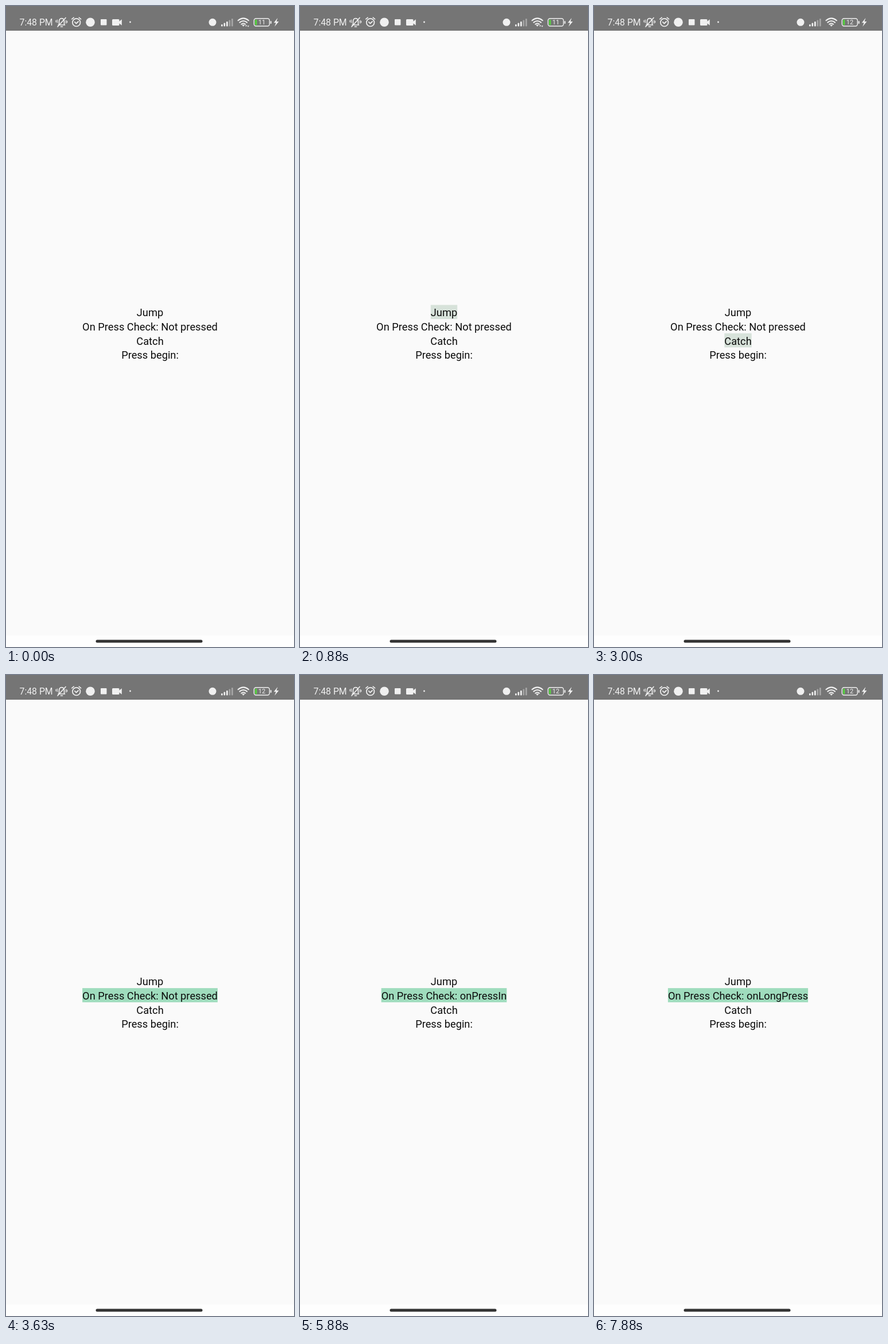
An HTML page that plays this animation: 502x1116 px, repeating every 8 s.

```html
<!DOCTYPE html>
<html lang="en">
<head>
<meta charset="utf-8">
<title>Press check</title>
<style>
  html, body { margin: 0; height: 100%; overflow: hidden; background: #fafafa; }
  svg { display: block; width: 502px; height: 1116px; font-family: Roboto, sans-serif; }
  .line { font-size: 18.25px; text-anchor: middle; fill: #0c0c0c; }
  .icon { fill: #f0f0f0; }
  .stroke { fill: none; stroke: #f0f0f0; stroke-width: 1.7; stroke-linecap: round; stroke-linejoin: round; }
</style>
</head>
<body>
<svg viewBox="0 0 502 1116">
  <rect width="502" height="1116" fill="#fafafa"/>
  <rect y="1096" width="502" height="20" fill="#fefefe"/>
  <rect x="156.5" y="1103.5" width="186" height="5" rx="2.5" fill="#333"/>
  <rect width="502" height="43" fill="#757575"/>

  <g class="icon">
    <text x="23.5" y="34" font-size="15.8">7:48 PM</text>
    <circle cx="147" cy="28.3" r="7.8"/>
    <rect x="165" y="23" width="10.5" height="10.5" rx="1"/>
    <path d="M186.5 23h9.5q1.5 0 1.5 1.5v2.3l4.3-3.6v10.6l-4.3-3.6v2.3q0 1.5-1.5 1.5h-9.5q-1.5 0-1.5-1.5v-8q0-1.5 1.5-1.5z"/>
    <circle cx="216.5" cy="28" r="1.4"/>
    <circle cx="360" cy="28.3" r="6.5"/>
    <path d="M473.5 20.8l-6.7 8.5h3.8l-2.5 6.6 7.4-8.8h-4z"/>
  </g>

  <!-- muted bell and alarm clock -->
  <g class="stroke">
    <path d="M91 33h11.5M92.5 33v-6q0-5 4.5-5.500q4.500 .5 4.500 5.500v6M95.500 36h3M104 20.500l-14 15.500"/>
    <path d="M89.300 24v5M87 25v3M104.600 25v5M106.600 26v3" stroke-width="1.2"/>
    <circle cx="122.700" cy="28.700" r="6.800"/>
    <path d="M119.800 27.800l2.500 2.700 3.800-3.500M114.800 22.800l3.300-2.700M130.600 22.800l-3.300-2.700"/>
  </g>

  <g id="signal" class="icon"></g>

  <g class="stroke" stroke-linecap="butt">
    <path d="M404.500 25.300q9.200-7.800 18.400 0M407.300 28.600q6.400-5.200 12.800 0M410.200 31.700q3.500-2.800 7 0" stroke-width="2"/>
    <path d="M412 33.300l1.700 2 1.700-2z" fill="#f0f0f0" stroke-width="1"/>
  </g>
  <path id="traffic" class="icon" d="M417 35.300l1.600-2.500 1.600 2.500zM420.600 34.200h3.200l-1.600 2.500z"/>

  <rect x="434" y="23.800" width="3.300" height="9.400" rx="1" fill="#58cf42"/>
  <rect class="stroke" x="432.300" y="21.800" width="27" height="13.200" rx="3.500" style="stroke-width:1.400"/>
  <rect class="icon" x="460.700" y="26" width="2" height="5" rx="1"/>
  <text id="charge" class="icon" x="446" y="32.400" font-size="11" text-anchor="middle"></text>

  <g id="lines"></g>
</svg>
<script>
const LOOP = 8000, PALE = '#d7e2da', GREEN = '#9fdcbd';
const $ = id => document.getElementById(id);

function add(parent, tag, attrs) {
  const node = document.createElementNS('http://www.w3.org/2000/svg', tag);
  for (const key in attrs) node.setAttribute(key, attrs[key]);
  return parent.appendChild(node);
}

for (let i = 0; i < 5; i++) {
  const h = 3.5 + i * 2.5;
  add($('signal'), 'rect', { x: 375 + i * 4.5, y: 35.5 - h, width: 2.7, height: h, rx: 1, opacity: i < 3 ? 1 : 0.4 });
}

const lines = ['Jump', '', 'Catch', 'Press begin:'].map((label, i) => {
  const back = add($('lines'), 'rect', { y: 520.5 + i * 24.65, height: 24.6 });
  const text = add($('lines'), 'text', { class: 'line', x: 251, y: 540.3 + i * 24.65 });
  text.textContent = label;
  return { back, text };
});

// Last entry whose start time has been reached
const at = (steps, t) => steps.filter(step => step[0] <= t).pop()[1];

const active = [[0, -1], [630, 0], [1380, 2], [3630, 1]];
const status = [[0, 'Not pressed'], [4750, 'onPress'], [5750, 'onPressIn'], [7500, 'onLongPress']];

function draw(now) {
  const t = now % LOOP, current = at(active, t);
  lines[1].text.textContent = 'On Press Check: ' + at(status, t);
  lines.forEach(({ back, text }, i) => {
    const width = text.getComputedTextLength();
    back.setAttribute('x', 251 - width / 2);
    back.setAttribute('width', width);
    back.setAttribute('fill', i !== current ? 'none' : i === 1 ? GREEN : PALE);
  });
  $('charge').textContent = t < 2750 ? '11' : '12';
  $('traffic').setAttribute('opacity', t < 2750 ? 1 : 0);
  requestAnimationFrame(draw);
}
requestAnimationFrame(draw);
</script>
</body>
</html>
```
